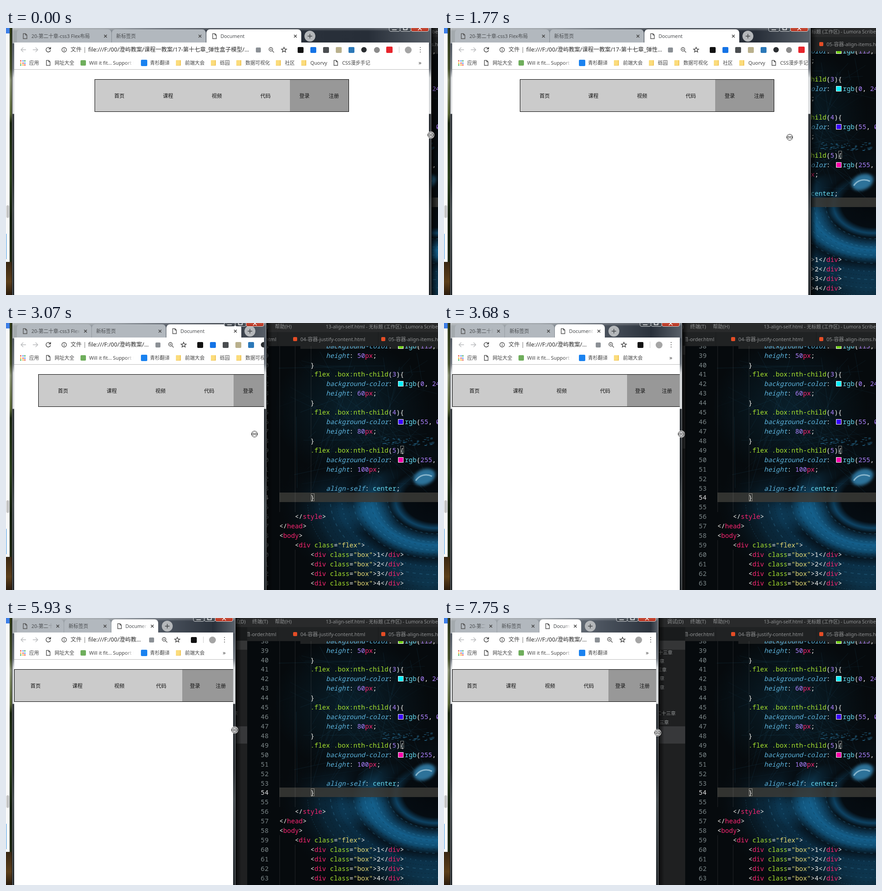
An HTML page with a canvas that plays this animation: 951 px wide and 589 px high, repeating every 8 s.

```html
<!DOCTYPE html>
<html lang="zh-CN">
<head>
<meta charset="utf-8">
<title>Resize</title>
<style>
html, body { margin: 0; width: 100%; height: 100%; overflow: hidden; background: #060a0d; }
#stage { position: absolute; left: 0; top: 0; width: 951px; height: 589px; overflow: hidden;
  font: 10.8px/20px "Noto Sans", "Noto Sans CJK SC", "Noto Sans CJK", sans-serif; color: #444; }
#stage div, #stage svg, #stage canvas { position: absolute; }
.fill { inset: 0; }
.t { white-space: pre; }

/* editor */
#editor { color: #8f9192; font-size: 11px; }
#menu { left: 400px; top: 0; width: 551px; height: 20px; background: #292a2b; }
#files { left: 400px; top: 20px; width: 551px; height: 31px; background: #191b1c; }
#files div { top: 0; height: 31px; background: #202223; }
#side { left: 400px; top: 50px; width: 131px; height: 539px; background: #1f2021; overflow: hidden; font-size: 10.5px; }
#code { left: 531px; top: 51px; width: 420px; height: 538px; overflow: hidden; color: #f2f2ee;
  font: 14.3px/21px "Noto Sans Mono", "DejaVu Sans Mono", monospace; }
.num { right: 373px; color: #7d888a; }
.num.on { color: #e4e4e4; }
.guide { width: 1px; background: #ffffff1c; }
.bracket { width: 8px; height: 17px; border: 1px solid #8a8a84; box-sizing: border-box; }
.sel { color: #a6e22e; } .val { color: #ae81ff; } .tag { color: #f92672; }
.str { color: #e6db74; } .fn { color: #66d9ef; } .prop { color: #5cb3dc; font-style: italic; }
.chip { display: inline-block; width: 10px; height: 10px; margin: 0 3px 0 4px; border: 1px solid #fff; vertical-align: -1px; }

/* browser window */
#win { clip-path: inset(0 calc(945px - var(--r)) 0 13px); background: linear-gradient(#59616a, #454d57 32px, #6d747c 90px, #d3d6d8 110px, #d9dbdd 189px, #2b3035 190px, #20252a 330px, #3c4347 400px, #1d2226); }
#caption { left: 14px; top: 0; height: 34px; width: calc(var(--r) - 10px);
  background: linear-gradient(#ffffff48, #0000 7px), linear-gradient(90deg, #a4aaae, #8d949b 200px, #4c545f 330px, #2c333d 440px, #272e38 85%, #596069); }
#shade { top: 0; height: 589px; width: 12px; left: calc(var(--r) + 6px); background: linear-gradient(90deg, #000a, #0000); }
.edge { top: 0; height: 589px; width: 1px; }
.tab { top: 3px; height: 30px; width: calc(var(--tw) - 1px); border-radius: 8px 8px 0 0; background: #b2b8be; color: #4a4d50; }
.tab.on { background: #fff; width: var(--tw); }
.tab .t { top: 5px; right: 24px; overflow: hidden; mask-image: linear-gradient(270deg, #0000, #000 14px); -webkit-mask-image: linear-gradient(270deg, #0000, #000 14px); }
.tab svg.x { right: 8px; }
#plus { left: calc(31.5px + 3 * var(--tw)); top: 6px; width: 24px; height: 24px; border-radius: 12px; background: #b4b7ba; }
#buttons { left: calc(var(--r) - 88px); top: -6px; width: 88px; height: 15px; }
#buttons div { top: 0; height: 14px; box-sizing: border-box; border: 1px solid #d8dbde; border-radius: 0 0 4px 4px; background: linear-gradient(#7c838b, #30363d); }
#buttons div.close { background: linear-gradient(#d5705c, #b42a17); }
#client { clip-path: inset(32px calc(951px - var(--r)) 0 18px); background: #fff; }
#url { left: 181px; top: 38px; width: calc(var(--star) - 255px); overflow: hidden; text-overflow: ellipsis; font-size: 12.5px; color: #2c2c2c; }
#pageIcons { left: var(--star); top: 48px; }
#exts { left: calc(var(--star) + 36.5px); top: 48px; }
#menuIcons { left: var(--menu); top: 48px; }
#more { left: calc(var(--l) - 23px); top: 66px; font-size: 13px; }
#rule { left: 18px; top: 91px; width: 933px; height: 1px; background: #bdbdbd; }
#nav { left: var(--nav); top: 113px; width: var(--w); height: 69.5px; padding: 1.25px 1px; background: #000; display: flex; font-size: 11.3px; color: #111; }
#nav section { display: flex; height: 100%; }
#nav span { flex: 1; text-align: center; line-height: 72px; }
#main { width: calc(.79 * var(--w) - 12px); background: #cbcbcb; }
#user { flex: 1; background: #989898; }
#cursor { left: -8px; top: -8px; }
</style>
</head>
<body>
<div id="stage">
  <div id="editor" class="fill">
    <canvas id="art" width="951" height="589"></canvas>
    <div id="menu"></div>
    <div id="files"></div>
    <div id="side"></div>
    <div id="code"></div>
  </div>
  <div id="desk" class="fill"></div>
  <div id="shade"></div>
  <div id="win" class="fill">
    <div id="caption"></div>
    <div id="tabs"></div>
    <div id="plus"></div>
    <div id="buttons"></div>
    <div id="client" class="fill">
      <div id="bar"></div>
      <div id="url" class="t">file:///F:/00/澄屿教案/课程一教案/17-第十七章_弹性盒子模型/05-案例/index.html</div>
      <div id="pageIcons"></div>
      <div id="exts"></div>
      <div id="menuIcons"></div>
      <div id="marks"></div>
      <div id="more" class="t">»</div>
      <div id="rule"></div>
      <div id="nav">
        <section id="main"><span>首页</span><span>课程</span><span>视频</span><span>代码</span></section>
        <section id="user"><span>登录</span><span>注册</span></section>
      </div>
    </div>
    <div class="edge" style="left:13px;background:#0b0e10"></div>
    <div class="edge" style="left:14px;background:#ffffff70"></div>
    <div class="edge" style="left:calc(var(--r) + 4px);background:#ffffff70"></div>
    <div class="edge" style="left:calc(var(--r) + 5px);background:#0b0e10"></div>
  </div>
  <svg id="cursor" width="16" height="16" viewBox="-8 -8 16 16" fill="none">
    <circle r="7" fill="#fffb" stroke="#fff" stroke-width="2"/>
    <circle r="6.6" stroke="#222"/>
    <path d="M-3 -3L-6 0L-3 3V1.2H3V3L6 0L3 -3V-1.2H-3Z" fill="#fff" stroke="#222" stroke-width=".9"/>
  </svg>
</div>
<script>
const $ = id => document.getElementById(id);
const add = (id, html) => $(id).insertAdjacentHTML('beforeend', html);
const text = (x, y, s, style = '') => `<div class="t" style="left:${x}px;top:${y - 10}px;${style}">${s}</div>`;
const textEnd = (right, y, s) => `<div class="t" style="right:${right}px;top:${y - 10}px">${s}</div>`;
const box = (x, y, w, h, bg, style = '') => `<div style="left:${x}px;top:${y}px;width:${w}px;height:${h}px;background:${bg};${style}"></div>`;
const dot = (x, y, r, bg) => box(x - r, y - r, 2 * r, 2 * r, bg, 'border-radius:50%');
const square = (x, y, s, bg) => box(x - s / 2, y - s / 2, s, s, bg, 'border-radius:2px');
const icon = (x, y, d, color = '#555', extra = '') =>
  `<svg style="left:${x - 8}px;top:${y - 8}px" width="16" height="16" viewBox="-8 -8 16 16" fill="none" stroke="${color}" stroke-width="1.4" ${extra}><path d="${d}"/></svg>`;
const sheet = 'M-4 -5.5H1L4 -2.5V5.5H-4ZM1 -5.5V-2.5H4';
const cross = 'M-3 -3L3 3M3 -3L-3 3';
const folder = (x, y) => box(x - 6, y - 6, 11, 12, '#fbdc7c', 'border-radius:1px;box-shadow:inset -2px -1px #f0c65a');

// dark wallpaper: lower half of a blue iris, a wire mesh above it
function drawArt() {
  const g = $('art').getContext('2d');
  let seed = 7;
  const rnd = () => (seed = seed * 16807 % 2147483647) / 2147483647;
  const glow = (x, y, rx, ry, ...stops) => {
    const grad = g.createRadialGradient(0, 0, 0, 0, 0, 1);
    stops.forEach(([at, c]) => grad.addColorStop(at, c));
    g.save();
    g.translate(x, y);
    g.scale(rx, ry);
    g.fillStyle = grad;
    g.fillRect(-1, -1, 2, 2);
    g.restore();
  };
  g.fillStyle = '#060a0d';
  g.fillRect(0, 0, 951, 589);
  glow(945, 390, 350, 250, [0, '#04080c'], [.2, '#050c12'], [.25, '#0e4364'], [.29, '#06121b'], [.33, '#0b3048'],
    [.4, '#145f8b'], [.46, '#0f4c70'], [.52, '#06141f'], [.6, '#0a2c42'], [.72, '#0a2536'], [1, '#060a0d00']);
  const fade = g.createLinearGradient(0, 50, 0, 410);
  fade.addColorStop(0, '#060a0d');
  fade.addColorStop(.75, '#060a0df0');
  fade.addColorStop(1, '#060a0d00');
  g.fillStyle = fade;
  g.fillRect(0, 0, 951, 589);
  glow(790, 420, 80, 45, [0, '#14608ca0'], [1, '#14608c00']);
  glow(930, 580, 110, 70, [0, '#12507470'], [1, '#12507400']);
  glow(760, 190, 170, 150, [0, '#0c344880'], [1, '#0c344800']);
  g.lineWidth = .7;
  for (let i = 0; i < 70; i++) {
    g.strokeStyle = `rgba(45,115,150,${.08 + .2 * rnd()})`;
    g.beginPath();
    g.moveTo(600 + 330 * rnd(), 60 + 300 * rnd());
    g.lineTo(640 + 310 * rnd(), 90 + 300 * rnd());
    g.stroke();
  }
  for (let r = 75; r < 210; r += 9) {
    g.setLineDash([2 + 5 * rnd(), 3 + 6 * rnd()]);
    g.strokeStyle = `rgba(${r % 2 ? '75,165,210' : '0,5,12'},.22)`;
    g.lineWidth = 1 + rnd();
    g.beginPath();
    g.ellipse(945, 390, 1.4 * r, r, 0, 1.5, 3.1);
    g.stroke();
  }
  g.setLineDash([]);
  g.fillStyle = '#2b779f90';
  for (let i = 0; i < 60; i++) g.fillRect(825 + 126 * rnd(), 252 + 18 * rnd(), 2 + 4 * rnd(), 1.5);
  g.filter = 'blur(3px)';
  g.fillStyle = '#2d7299';
  g.beginPath();
  g.ellipse(921, 340, 25, 17, -.4, 0, 7);
  g.fill();
  g.filter = 'none';
  g.strokeStyle = '#86b4cb';
  g.lineWidth = 3;
  g.beginPath();
  g.arc(925, 362, 27, 3.7, 5.2);
  g.stroke();
}

function buildEditor() {
  add('editor', text(491, 8, '调试(D)') + text(542, 8, '终端(T)') + text(592, 8, '帮助(H)') +
    text(704, 8, '13-align-self.html - 无标题 (工作区) - Lumora Scribe Pad', 'font-size:10.5px'));
  add('files', `<div style="left:131px;width:67px;overflow:hidden">${textEnd(3, 16, '03-项目-order.html')}</div>` +
    box(199, 0, 220, 31, '#202223') + box(420, 0, 131, 31, '#202223') +
    square(236, 15, 9, '#e44d26') + text(248, 16, '04-容器-justify-content.html') +
    square(430, 15, 9, '#e44d26') + text(442, 16, '05-容器-align-items.html'));
  add('side', box(0, 0, 131, 20, '#343536') + box(0, 189, 131, 38, '#37383a'));
  [[76, 503], [95, 485], [114, 490], [133, 485], [153, 485], [210, 510], [230, 495]]
    .forEach(([y, end]) => add('side', textEnd(531 - end, y - 50, '第二十三章')));

  const c = (cls, s) => `<span class="${cls}">${s}</span>`;
  const rule = n => [2, c('sel', '.flex .box:nth-child') + `(${c('val', n)}){`];
  const color = rgb => [3, `${c('prop', 'background-color')}: <span class="chip" style="background:rgb(${rgb})"></span>` +
    `${c('fn', 'rgb')}(${rgb.split(', ').map(v => c('val', v)).join(', ')});`];
  const height = n => [3, `${c('prop', 'height')}: ${c('val', n)}${c('tag', 'px')};`];
  const close = [2, '}'], none = [0, ''];
  const open = (tag, cls) => `&lt;${c('tag', tag)}${cls ? ` ${c('sel', 'class')}=${c('str', `"${cls}"`)}` : ''}&gt;`;
  const shut = tag => `&lt;/${c('tag', tag)}&gt;`;
  const item = n => [2, open('div', 'box') + n + shut('div')];
  const lines = [
    color('115, 210, 22'), height(50), close,
    rule(3), color('0, 240, 255'), height(60), close,
    rule(4), color('55, 0, 255'), height(80), close,
    rule(5), color('255, 0, 170'), height(100), none,
    [3, `${c('prop', 'align-self')}: ${c('fn', 'center')};`], close, none,
    [1, shut('style')], [0, shut('head')], [0, open('body')], [1, open('div', 'flex')],
    ...[1, 2, 3, 4, 5].map(item)
  ];
  add('code', box(71, 323, 349, 21, '#3a3a37d8'));
  [[71, 0, 366], [105, 0, 366], [140, 0, 323], [71, 428, 110], [105, 449, 89]].forEach(([x, y, h]) =>
    add('code', `<div class="guide" style="left:${x}px;top:${y}px;height:${h}px"></div>`));
  [[140, 325], [337, 220]].forEach(([x, y]) =>
    add('code', `<div class="bracket" style="left:${x}px;top:${y}px"></div>`));
  lines.forEach(([indent, html], i) => {
    const top = 50.2 + 20.92 * i - 61.5;
    const no = 38 + i;
    add('code', `<div class="t num${no === 54 ? ' on' : ''}" style="top:${top}px">${no}</div>` +
      `<div class="t" style="left:${70.7 + 34.3 * indent}px;top:${top}px">${html}</div>`);
  });
}

function buildWindow() {
  add('desk', box(0, 0, 13, 589, 'linear-gradient(#2f3a1c,#4a5530 90px,#8b9377 115px,#5c6a3a 190px,#1d2a14 210px,#2e4420 330px,#14200f 420px,#1e2a14 515px,#3a2712 517px,#5b3e1a 560px,#2b1c0d)') +
    box(0, 0, 8, 516, '#fafafa') + box(0, 0, 8, 12, '#3d7fe8') +
    box(1, 391, 6, 28, '#c4c4c4', 'border-radius:3px') + box(0, 454, 1, 56, '#2f8fe0'));

  const tab = (i, x, title, cls = '') => `<div class="tab ${cls}" style="left:calc(24px + ${i} * var(--tw))">` +
    (x > 20 ? icon(18, 15, sheet) : '') + `<div class="t" style="left:${x}px">${title}</div>` +
    `<svg class="x" style="top:10px" width="10" height="10" viewBox="-5 -5 10 10" stroke="#444" stroke-width="1.5"><path d="${cross}"/></svg></div>`;
  add('tabs', tab(0, 32, '20-第二十章-css3 Flex布局') + tab(1, 10, '新标签页') + tab(2, 31, 'Document', 'on'));
  add('plus', icon(12, 12, 'M-5 0H5M0 -5V5', '#3c4043'));
  add('buttons', '<div style="left:0;width:25px"></div><div style="left:24px;width:25px"></div><div class="close" style="left:48px;width:40px"></div>' +
    icon(12, 11, 'M-5 -1H5', '#fff', 'style="stroke-width:3"') + icon(36, 7, 'M-4 -4H4V3H-4Z', '#fff') + icon(68, 7, 'M-4 -4L4 4M4 -4L-4 4', '#fff'));

  add('bar', icon(38, 48, 'M6 0H-5M0 -5L-5 0L0 5', '#b9bbbd') + icon(65, 48, 'M-6 0H5M0 -5L5 0L0 5', '#b9bbbd') +
    icon(93, 48, 'M4.5 -2.5A5 5 0 1 0 5 1M5.3 -6V-1.8H1', '#444') +
    icon(128, 48, 'M-5 0A5 5 0 1 1 5 0A5 5 0 1 1 -5 0M0 -1V3M0 -3.2V-2', '#555') +
    text(142, 48, '文件', 'font-size:12.3px') + box(172.5, 42, 1, 13, '#777'));
  add('pageIcons', square(-56, 0, 11, '#8b9095') + icon(-28, 0, 'M-5 -1A4 4 0 1 1 3 -1A4 4 0 1 1 -5 -1M2 2L6 6M-3 -1H1', '#555') +
    icon(0, 0, 'M0 -5.5L1.6 -1.8L5.6 -1.5L2.5 1.1L3.5 5L0 2.9L-3.5 5L-2.5 1.1L-5.6 -1.5L-1.6 -1.8Z', '#444', 'style="stroke-width:1.2"'));
  ['#111', '#1473e6', '#4a4d50', '#b9b08c', '#2b78b8'].forEach((bg, i) => add('exts', square(28 * i, 0, 13, bg)));
  add('exts', dot(140, 0, 6, '#2a2d30') + dot(168, 0, 6.5, '#8b8b8b') + square(196, 0, 14, '#e8242c'));
  add('menuIcons', '<div id="divider" style="left:-47px;top:-7px;width:1px;height:14px;background:#ccc"></div>' + dot(-27, 0, 7.5, '#a5a5a5') +
    [-5, 0, 5].map(y => dot(0, y, 1.4, '#555')).join(''));

  const mark = (x, end, pic, label, style) => `<div data-end="${end}">${pic + text(x, 77, label, style)}</div>`;
  const hues = ['#e8453c', '#f3a712', '#34a853', '#4285f4'];
  const grid = [0, 1, 2].flatMap(row => [0, 1, 2].map(col =>
    square(32.5 + col * 4.5, 72.5 + row * 4.5, 3, hues[(col * 3 + row) % 4]))).join('');
  const soft = 'width:98px;overflow:hidden;-webkit-mask-image:linear-gradient(270deg,#0000,#000 18px)';
  add('marks', mark(51, 72, grid, '应用') + mark(107, 149, icon(93, 77, sheet), '网址大全') +
    mark(183, 281, square(170, 77, 12, '#6fae5c'), 'Will it fit... Support tables', soft) +
    mark(317, 360, square(304, 77, 14, '#1a82f0'), '青杉翻译') +
    [[394, 436, '前端大会'], [471, 492, '砾园'], [527, 579, '数据可视化'], [614, 635, '社区'], [670, 705, 'Quorvy']]
      .map(([x, end, s]) => mark(x, end, folder(x - 14, 77), s)).join('') +
    mark(740, 801, icon(726, 77, sheet), 'CSS漫步手记'));
}

// time, window edge, page layout edge (repaints late), cursor x, cursor y
const poses = [
  [0, 931, 931, 935, 236], [480, 931, 931, 935, 236], [1500, 856, 892, 826, 239],
  [1770, 802, 874, 761, 241], [2650, 680, 682, 679, 243], [2790, 655, 682, 640, 244],
  [3070, 568, 682, 547, 245], [3680, 519, 519, 522, 245], [4450, 472, 472, 475, 245],
  [5230, 472, 472, 475, 245], [5930, 500, 500, 503, 247], [6320, 534, 530, 537, 249],
  [6610, 540, 540, 543, 250], [6930, 518, 533, 506, 251], [7390, 481, 481, 480, 252],
  [7750, 467, 467, 470, 253]
];
const ticks = [
  0, 590, 770, 950, 1140, 1320, 1500,
  1670, 1770, 1960, 2100, 2240, 2380, 2510, 2650,
  2790, 2930, 3070, 3140, 3280, 3410, 3550, 3680,
  3850, 4000, 4150, 4300, 4450,
  5370, 5510, 5650, 5790, 5930, 6080, 6200, 6320,
  6480, 6610, 6740, 6840, 6930, 7000, 7200, 7390,
  7610, 7750
];

function poseAt(t) {
  const i = poses.findLastIndex(p => p[0] <= t);
  const a = poses[i], b = poses[i + 1] || a;
  const k = a === b ? 0 : (t - a[0]) / (b[0] - a[0]);
  return a.slice(1).map((v, j) => Math.round(v + (b[j + 1] - v) * k));
}

let shown = -1;
function render(now) {
  const t = now % 8000;
  const tick = ticks.findLast(v => v <= t);
  if (tick !== shown) {
    shown = tick;
    const [r, l, cx, cy] = poseAt(tick);
    const count = Math.max(0, Math.min(8, Math.floor((l - 472) / 28)));
    const menu = l - (count ? 19 : 12);
    const vars = {
      r, l, menu,
      star: count ? menu - 76.5 - 28 * count : menu - 62,
      tw: Math.min(208.6, (l - 188.5) / 3),
      w: Math.min(l - 18, 558),
      nav: Math.max(18, Math.round((l + 18) / 2 - 279.5))
    };
    for (const name in vars) $('stage').style.setProperty('--' + name, vars[name] + 'px');
    [...$('exts').children].forEach((e, i) => e.hidden = i >= count);
    $('divider').hidden = !count;
    for (const m of $('marks').children) m.hidden = m.dataset.end > l - 45;
    $('cursor').style.transform = `translate(${cx}px,${cy}px)`;
  }
  requestAnimationFrame(() => render(performance.now() - start));
}

drawArt();
buildEditor();
buildWindow();
const start = performance.now();
render(0);
</script>
</body>
</html>
```
